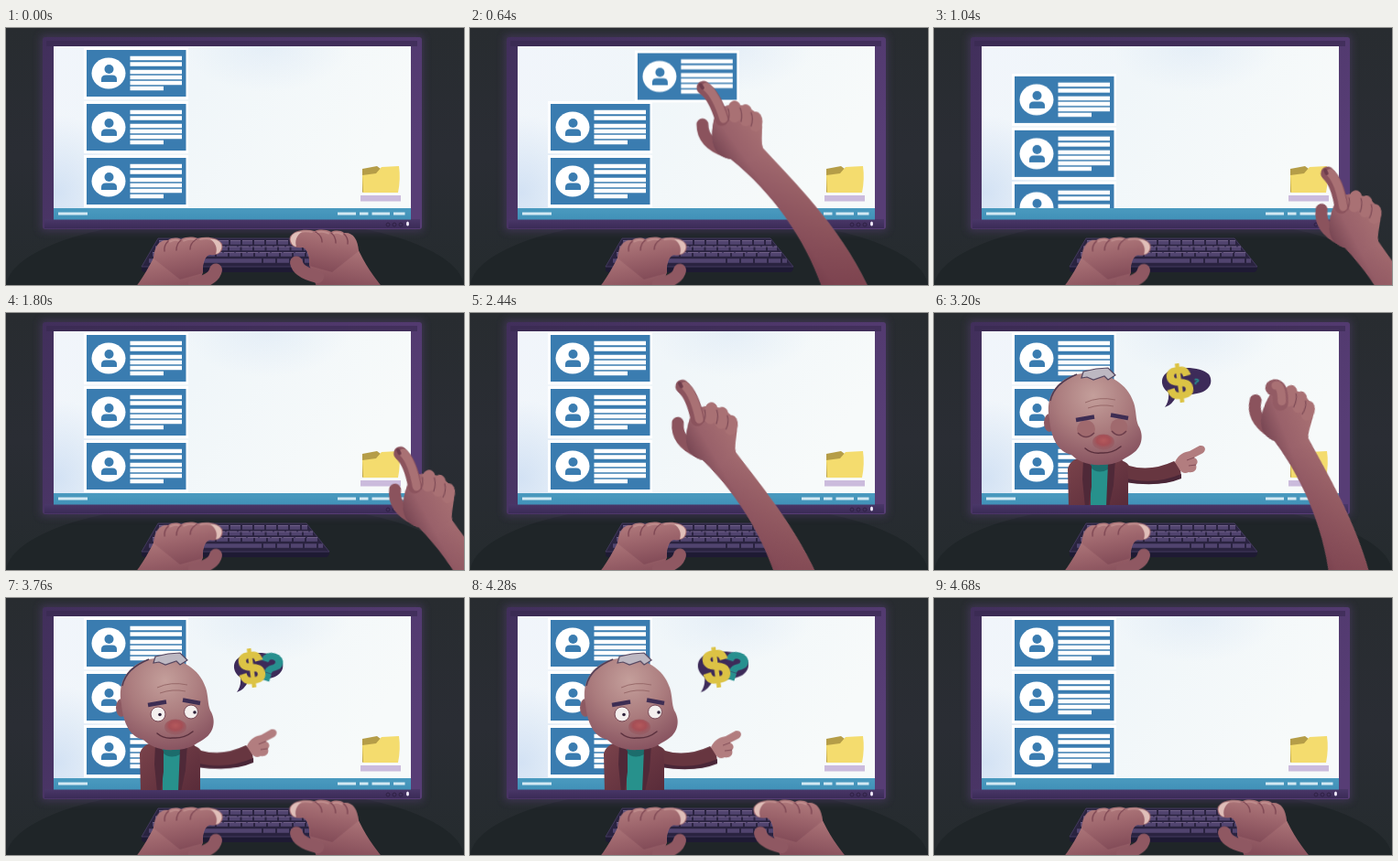
Recreate the animation shown at these times as an HTML page. Size 500 by 281 pixels, loop 4800 ms.

```html
<!DOCTYPE html>
<html lang="en">
<head>
<meta charset="utf-8">
<title>Desk scene</title>
<style>
html, body { margin: 0; width: 100%; height: 100%; overflow: hidden; background: #22272b; }
svg { display: block; width: 100vw; height: 100vh; }
text { font: 700 50px "Liberation Sans", Arial, sans-serif; text-anchor: middle; }
#ask text { font-size: 42px; }
.anim { animation: 4.8s ease-in-out infinite; }

/* 1% = 48 ms */
#drag { animation-name: drag; transform-origin: 142px 50px; }
@keyframes drag {
  0%, 9.17% { transform: none; opacity: 1; }
  13.33% { transform: translate(94px, 3px); opacity: 1; animation-timing-function: linear; }
  18.33% { transform: translate(262px, 96px) scale(.7); opacity: 1; }
  20.83% { transform: translate(267px, 117px) scale(.12); opacity: 1; animation-timing-function: step-start; }
  21%, 100% { transform: translate(267px, 117px) scale(.12); opacity: 0; }
}
#list { animation-name: list; }
@keyframes list {
  0%, 20% { transform: none; }
  23.33%, 100% { transform: translateY(-59px); }
}

#typing { animation-name: typing; animation-timing-function: step-end; }
@keyframes typing {
  0%, 76.67% { opacity: 1; }
  1.67% { opacity: 0; }
}
#reach { animation-name: reach, show; animation-timing-function: ease-in-out, step-end; transform-origin: 250px 62px; }
@keyframes show {
  0%, 76.67% { opacity: 0; }
  1.67% { opacity: 1; }
}
@keyframes reach {
  0%, 1.67% { transform: translate(62px, 165px) rotate(0deg); }
  7.5%, 9.17% { transform: translate(-94px, -3px) rotate(0deg); }
  13.33% { transform: none; animation-timing-function: linear; }
  18.33% { transform: translate(165px, 75px) rotate(6deg); }
  20.83% { transform: translate(176px, 94px) rotate(8deg); }
  25% { transform: translate(177px, 88px) rotate(7deg); }
  29% { transform: translate(175px, 83px) rotate(7deg); }
  33%, 40.5% { transform: translate(177px, 88px) rotate(7deg); }
  46.67% { transform: translate(42px, 36px) rotate(7deg); }
  50.83% { transform: translate(-22px, 15px) rotate(5.5deg); }
  54.17% { transform: translate(-54px, 4px) rotate(5deg); }
  58.33% { transform: translate(111px, -10px) rotate(14deg); }
  62% { transform: translate(107px, -6px) rotate(13deg); }
  66.67%, 70.83% { transform: translate(109px, -9px) rotate(14.5deg); }
  76.67%, 100% { transform: translate(62px, 165px) rotate(4deg); }
}
#point { animation-name: point; animation-timing-function: step-end; }
#curl { animation-name: curl; animation-timing-function: step-end; }
@keyframes point { 0%, 75% { opacity: 1; } 55.83% { opacity: 0; } }
@keyframes curl { 0%, 75% { opacity: 0; } 55.83% { opacity: 1; } }

.tap { animation: tap .32s ease-in-out infinite; transform-origin: 190px 262px; }
@keyframes tap { 0%, 100% { transform: none; } 50% { transform: rotate(.8deg); } }

#man { animation-name: man; transform-origin: 180px 210px; }
@keyframes man {
  0%, 54.17% { transform: translateY(165px) rotate(-20deg); }
  56.67% { transform: translateY(0) rotate(-12deg) scale(1.05, 1.1); }
  58.33% { transform: rotate(4deg) scale(1, .96); }
  60%, 93.33% { transform: none; }
  95% { transform: rotate(-7deg) scale(1.04); }
  96.67%, 100% { transform: translateY(165px) rotate(-7deg); }
}
#head { animation-name: head; transform-origin: 180px 165px; }
#arm { animation-name: arm; transform-origin: 206px 172px; }
@keyframes head {
  0%, 66.67%, 78.33%, 90%, 100% { transform: none; }
  72.5% { transform: rotate(-1.5deg); }
  84% { transform: rotate(2deg); }
}
@keyframes arm {
  0%, 60%, 66.67%, 90%, 100% { transform: none; }
  63% { transform: rotate(4deg); }
  72.5% { transform: rotate(3deg); }
  78.33% { transform: rotate(-1deg); }
  84% { transform: rotate(4deg); }
}
#lids { animation-name: lids; animation-timing-function: step-end; }
@keyframes lids { 0%, 68.33%, 89.17% { opacity: 0; } 65%, 86.67% { opacity: 1; } }

#bubble { animation-name: bubble; transform-origin: 254px 102px; }
@keyframes bubble {
  0%, 60% { transform: scale(0); }
  63% { transform: scale(1.18); }
  65%, 80% { transform: none; }
  87% { transform: scale(1.08); }
  91% { transform: none; }
  94.5% { transform: scale(1.18); }
  96.67%, 100% { transform: scale(0); }
}
#ask { animation-name: ask; transform-origin: 286px 74px; }
@keyframes ask {
  0%, 65.5% { transform: scale(0); }
  66.67% { transform: scale(.22); }
  70% { transform: scale(1.12); }
  72%, 100% { transform: none; }
}
</style>
</head>
<body>
<svg viewBox="0 0 500 281" preserveAspectRatio="none">
  <defs>
    <linearGradient id="room" x2="0" y2="1">
      <stop stop-color="#282c30"/><stop offset=".5" stop-color="#2a2d34"/><stop offset="1" stop-color="#252b2e"/>
    </linearGradient>
    <linearGradient id="frame" x2="1" y2=".5">
      <stop stop-color="#412f5b"/><stop offset=".5" stop-color="#4c3668"/><stop offset="1" stop-color="#573d75"/>
    </linearGradient>
    <linearGradient id="lip" x2="0" y2="1">
      <stop stop-color="#4a3768"/><stop offset="1" stop-color="#3b2b57"/>
    </linearGradient>
    <linearGradient id="glass" x2="1" y2=".3">
      <stop stop-color="#f1f5fb"/><stop offset=".45" stop-color="#f0f6f9"/><stop offset="1" stop-color="#f7fafa"/>
    </linearGradient>
    <radialGradient id="haze"><stop stop-color="#d3e2f4"/><stop offset="1" stop-color="#d3e2f4" stop-opacity="0"/></radialGradient>
    <linearGradient id="bar" x2="0" y2="1">
      <stop stop-color="#4a9abf"/><stop offset="1" stop-color="#4191b8"/>
    </linearGradient>
    <linearGradient id="skin" gradientUnits="userSpaceOnUse" x1="323" y1="221" x2="372" y2="186">
      <stop stop-color="#70404e"/><stop offset=".45" stop-color="#99616a"/><stop offset="1" stop-color="#a76f72"/>
    </linearGradient>
    <linearGradient id="shade" gradientUnits="userSpaceOnUse" x1="310" y1="140" x2="410" y2="285">
      <stop stop-color="#6e3442" stop-opacity="0"/><stop offset="1" stop-color="#6e3442" stop-opacity=".7"/>
    </linearGradient>
    <linearGradient id="palm" x2=".3" y2="1">
      <stop stop-color="#b57f80"/><stop offset=".5" stop-color="#9d656c"/><stop offset="1" stop-color="#844d59"/>
    </linearGradient>
    <radialGradient id="face" cx=".48" cy=".25" r=".8">
      <stop stop-color="#c49f9b"/><stop offset=".5" stop-color="#aa7b7d"/><stop offset="1" stop-color="#844f5d"/>
    </radialGradient>
    <radialGradient id="nose" cx=".5" cy=".4">
      <stop stop-color="#b4595c"/><stop offset=".6" stop-color="#a54e55"/><stop offset="1" stop-color="#96525a" stop-opacity=".5"/>
    </radialGradient>
    <linearGradient id="coat" x2="1" y2="1">
      <stop stop-color="#7b434b"/><stop offset="1" stop-color="#582b39"/>
    </linearGradient>
    <filter id="glow" x="-10%" y="-10%" width="120%" height="120%"><feGaussianBlur stdDeviation="4"/></filter>
    <clipPath id="screen"><path d="M52 20H442V210H52Z"/></clipPath>
    <clipPath id="desktop"><path d="M52 20H442V197H52Z"/></clipPath>

    <g id="card">
      <path fill="#fff" d="M85 21H199V78H85Z"/>
      <path fill="#3a7cb0" d="M88 24H196.500V75H88Z"/>
      <ellipse cx="112" cy="49.500" rx="18.500" ry="17" fill="#fff"/>
      <circle cx="112.500" cy="45" r="5" fill="#3a7cb0"/>
      <path fill="#3a7cb0" d="M104 59V56Q104 51.500 109 51.500H116Q121 51.500 121 56V59Z"/>
      <path stroke="#fff" stroke-width="4.500" d="M135.500 33H192M135.500 39.500H192M135.500 48H192M135.500 54H192M135.500 60H192M135.500 66H172"/>
    </g>

    <g id="hand">
      <path fill="url(#palm)" d="M133 294C150 274 158 258 164 245L220 248Q214 256 215 267L206 294Z"/>
      <g class="tap">
        <path fill="none" stroke="#8f5862" stroke-width="14" stroke-linecap="round" d="M229 264.500Q227 275 206 280"/>
        <path fill="url(#palm)" d="M161 252C162 239 167 231 177 232C181 229 187 229 191 231C197 228 204 228 209 230C219 227 232 229 236 236C238 245 232 249 222 248C215 251 214 259 215 268L190 275Z"/>
        <path fill="none" stroke="#c59593" stroke-width="2" stroke-linecap="round" opacity=".7" d="M179 233.500Q185 230.500 189 233M194 232.500Q201 229.500 207 232M212 231Q219 229.500 224 231"/>
        <path fill="#e0bfb9" d="M223 231C230 230 235 234 235.500 239C235 244 232 247 229 247C231 241 229 235 223 231Z"/>
        <path fill="none" stroke="#7d4653" stroke-width="1.400" stroke-linecap="round" d="M177 233Q172 238 173 244M191 232Q186 236 186 243M208 231Q201 235 201 242"/>
      </g>
    </g>
  </defs>

  <path fill="url(#room)" d="M0 0H500V281H0Z"/>
  <ellipse cx="250" cy="284" rx="250" ry="78" fill="#1f2528"/>

  <!-- monitor -->
  <rect x="38" y="8" width="417" height="214" fill="#4d3b68" opacity=".65" filter="url(#glow)"/>
  <rect x="40" y="10" width="414" height="210" rx="3" fill="url(#frame)"/>
  <path fill="#38294f" opacity=".6" d="M44 14H449V20H44Z"/>
  <path fill="url(#lip)" d="M42 209H452V219H42Z"/>
  <path fill="url(#glass)" d="M52 20H442V197H52Z"/>
  <g clip-path="url(#desktop)">
    <ellipse cx="56" cy="180" rx="75" ry="85" fill="url(#haze)"/>
    <ellipse cx="285" cy="20" rx="90" ry="50" fill="url(#haze)" opacity=".4"/>
  </g>
  <path fill="url(#bar)" d="M52 197H442V209.500H52Z"/>
  <path stroke="#d3e9f3" stroke-width="3" d="M57 203H89M362 203H382M386 203H395.500M399.500 203H419M423 203H435.500"/>
  <g fill="none" stroke="#2f2145"><circle cx="417" cy="215" r="2"/><circle cx="424" cy="215" r="2"/><circle cx="431" cy="215" r="2"/></g>
  <ellipse cx="438.500" cy="214" rx="1.500" ry="2.500" fill="#f3ecff"/>

  <!-- folder -->
  <path fill="#b59d48" d="M389 154L405 151L409 154V166L389 180Z"/>
  <path fill="#f4dc6e" d="M389 161L404 159L410 152L429 151Q431 165 428 180H390Z"/>
  <path fill="#cbbbdc" d="M387 183H431V189.500H387Z"/>

  <g clip-path="url(#desktop)">
    <g id="list" class="anim">
      <use href="#card" y="59"/><use href="#card" y="118"/><use href="#card" y="177"/>
    </g>
  </g>
  <use id="drag" class="anim" href="#card"/>

  <!-- visitor -->
  <g clip-path="url(#screen)">
    <g id="man" class="anim">
      <g id="arm" class="anim">
        <path fill="#673640" d="M198 162Q208 160 213 167Q236 174 262 162Q270 168 270 180Q246 191 212 184Z"/>
        <path fill="#492637" d="M206 180Q240 189 270 176V181Q246 191 208 185Z"/>
        <path fill="#b27d7f" d="M263 163C267 154 274 152 279 151L290 145C297 144 298 151 292 154L284 158C289 160 288 165 286 166C288 172 283 175 278 174Q272 177 268 171Z"/>
        <path fill="none" stroke="#824d58" d="M276 161L284 158M278 167L286 166"/>
      </g>
      <path fill="url(#coat)" d="M147 212L146 170Q149 159 165 157H199Q212 162 212 180V212Z"/>
      <path fill="#27918c" d="M171 158H190V212H171Z"/>
      <path fill="#1c6c6c" d="M171 158H190V171Q179 177 171 169Z"/>
      <path fill="#4f2938" d="M163 160L172 167L172 190L169 212H165L162 182ZM190 164L198 160L196 188L191 212H188Z"/>
      <g id="head" class="anim">
        <ellipse cx="126" cy="120" rx="6" ry="10" fill="#8d5962"/>
        <path fill="url(#face)" d="M126 116C121 92 133 73 156 67C180 61 210 72 218 98C221 107 220 116 223 123C230 134 227 148 215 155C206 160 200 166 184 166C168 167 157 162 150 155C136 152 128 138 126 116Z"/>
        <path fill="none" stroke="#4d3a52" stroke-width="1.500" d="M127 96Q131 77 156 67"/>
        <path fill="#bdb8c2" stroke="#54465f" stroke-width="1.200" d="M161 71L163 64L177 61L190 60L198 68L190 73L186 69L174 73L167 70Z"/>
        <path fill="none" stroke="#976969" stroke-width="1" d="M165 98Q180 91 198 95M168 104Q182 99 196 102"/>
        <g fill="#f4efee" stroke="#754653" stroke-width="1"><circle cx="166" cy="127" r="8"/><circle cx="202" cy="124.500" r="7.500"/></g>
        <g fill="#2d2038"><circle cx="168" cy="127.500" r="1.800"/><circle cx="206" cy="125" r="1.800"/></g>
        <g id="lids" class="anim" fill="#a06a6e">
          <circle cx="166" cy="127" r="10"/><circle cx="202" cy="125" r="9.500"/>
          <path fill="none" stroke="#6d3f4c" stroke-width="1.500" d="M157 131Q166 140 175 131M194 129Q202 138 210 129"/>
        </g>
        <path fill="none" stroke="#3d2d53" stroke-width="4.500" d="M155 117L175 113.500M193 111.500L212 115"/>
        <path fill="none" stroke="#592f3c" stroke-width="1.500" stroke-linecap="round" d="M165 148Q172 154 182 153Q194 154 204 146"/>
        <ellipse cx="185" cy="141" rx="12" ry="8.500" fill="url(#nose)"/>
      </g>
    </g>
  </g>

  <g id="bubble" class="anim">
    <path fill="#3d2b59" d="M256 87C246 80 246 67 260 62C274 58 293 60 300 67C306 76 300 86 287 88Q274 91 265 90Q260 101 252 103Q257 96 256 87Z"/>
    <g id="ask" class="anim">
      <text x="289" y="90" fill="#28908f" stroke="#28908f" stroke-width="2.500" transform="rotate(18 289 75)">?</text>
    </g>
    <text x="268" y="93" fill="#dcc345" stroke="#dcc345" stroke-width="2" transform="rotate(-8 268 76)">$</text>
  </g>

  <!-- keyboard -->
  <path fill="#1e1a33" d="M148 261L353 260V263Q352 267 349 267H152Q148 267 148 264Z"/>
  <path fill="#2a2340" stroke="#4a3f66" stroke-width=".8" d="M166 230H328L353 261H148Z"/>
  <g stroke="#51446f" stroke-width="4.500">
    <path stroke-dasharray="11 2" d="M167 234.500H329"/>
    <path stroke-dasharray="11.500 2" d="M163 241H335"/>
    <path stroke-dasharray="12 2" d="M160 247.500H341"/>
    <path stroke-dasharray="13 2" d="M156 254.500H220M281 254.500H346"/>
    <path d="M220 254.500H279"/>
  </g>
  <path stroke="#7b6a92" stroke-width=".8" stroke-dasharray="11 2" d="M167 232.500H329M163 239H335M160 245.500H341"/>

  <!-- hands -->
  <use href="#hand"/>
  <g id="typing" class="anim"><use href="#hand" transform="matrix(-1 0 0 1 546 -8)"/></g>
  <g id="reach" class="anim">
    <path fill="none" stroke="#8b535d" stroke-width="13" stroke-linecap="round" d="M253 105Q253 126 280 135"/>
    <g id="limb">
      <path id="sleeve" fill="url(#skin)" d="M266 98C270 80 300 78 316 97C321 108 315 118 319 131C350 165 402 215 433 281L520 455H455L383 281C365 230 330 180 284 143C262 140 261 118 266 98Z"/>
      <use href="#sleeve" style="fill:url(#shade)"/>
      <path fill="url(#shade)" d="M319 131C350 165 402 215 433 281L520 455H455L383 281C365 230 330 180 284 143Z"/>
    </g>
    <g fill="#a97174">
      <ellipse cx="311" cy="102" rx="7.500" ry="11"/><ellipse cx="300" cy="95" rx="8" ry="12"/><ellipse cx="288" cy="91" rx="8" ry="12"/>
    </g>
    <path fill="none" stroke="#7d4a56" stroke-width="1.200" stroke-linecap="round" d="M281 88Q283 95 281 101M294 87Q297 94 295 102M306 92Q309 99 306 107"/>
    <g id="point" class="anim" fill="none" stroke-linecap="round">
      <path stroke="#8b535d" stroke-width="15" d="M254 65Q266 73 274 99"/>
      <path stroke="#a97174" stroke-width="9" d="M257 64Q268 73 276 99"/>
      <path stroke="#6e3d4c" stroke-width="4" d="M251 62L253 65"/>
    </g>
    <g id="curl" class="anim" fill="none" stroke-linecap="round">
      <path stroke="#935b64" stroke-width="17" d="M268 87Q275 81 280 101"/>
      <path stroke="#a97174" stroke-width="9" d="M270 84Q276 81 281 99"/>
    </g>
  </g>
</svg>
</body>
</html>
```
